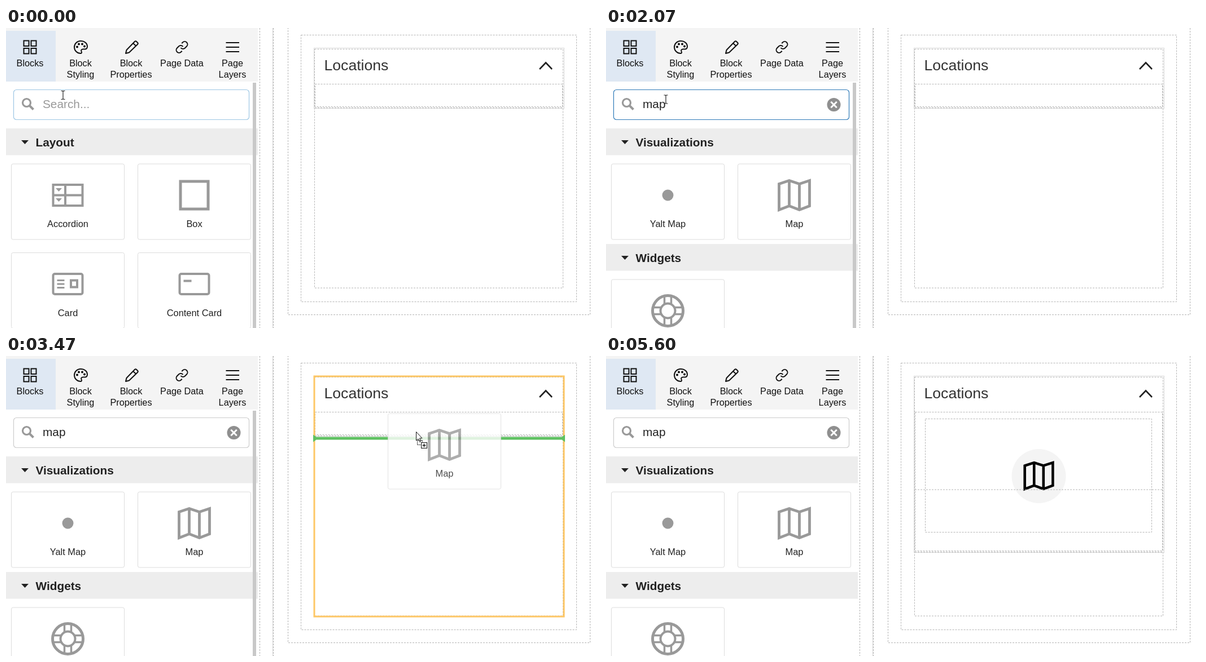
These frames come from a looping animation (1052x532 px, 6190 ms). An HTML page:

```html
<!DOCTYPE html>
<html lang="en">
<head>
<meta charset="utf-8">
<title>Page builder</title>
<style>
html, body { margin: 0; width: 100%; height: 100%; overflow: hidden; background: #fff; }
svg { display: block; width: 1052px; height: 532px; font-family: "Liberation Sans", Arial, sans-serif; }
.line { fill: none; stroke: #111; stroke-width: 2; stroke-linejoin: round; }
.dash { fill: none; stroke: #b4b4b4; stroke-dasharray: 3 2; }
.solid { fill: none; stroke: #dadada; }
.gray { fill: none; stroke: #999; stroke-width: 4; }
.drop { fill: none; stroke: #fec766; stroke-width: 3; }
.hover { fill: none; stroke: #3d9ae8; stroke-width: 1.4; }
.tab { font-size: 16.25px; text-anchor: middle; fill: #111; }
.name { font-size: 16.4px; text-anchor: middle; fill: #222; }
.head { font-size: 20.8px; font-weight: bold; fill: #222; }
.query { font-size: 20.8px; }
</style>
</head>
<body>
<svg id="stage" viewBox="0 0 1052 532"></svg>
<script>
const rect = (x, y, x2, y2, cls, extra = '') =>
  `<rect x="${x}" y="${y}" width="${x2 - x}" height="${y2 - y}" class="${cls}" ${extra}/>`;
const path = (d, cls, extra = '') => `<path d="${d}" class="${cls}" ${extra}/>`;
const text = (x, y, cls, s, extra = '') => `<text x="${x}" y="${y}" class="${cls}" ${extra}>${s}</text>`;
const group = (id, body, extra = '') => `<g id="${id}" ${extra}>${body}</g>`;
const at = (x, y, body) => `<g transform="translate(${x} ${y})">${body}</g>`;

const mapShape = 'M-27-20L-9-26 9-20 27-26V19L9 26-9 19-27 26ZM-9-26V19M9-20V26';

// Icons are drawn around their own centre.
const icons = {
  accordion: rect(-26, -18.5, 26, 18.5, 'gray') + path('M-26 0H26M-4.5-18V18', 'gray') +
    path('M-21.5-12.5h11l-5.5 6zM-21.5 5.5h11l-5.5 6z', '', 'fill="#999"'),
  box: rect(-24.5, -24.5, 24.5, 24.5, 'gray', 'style="stroke-width:5"'),
  card: rect(-26, -18, 26, 18, 'gray', 'rx="3"') +
    path('M-19-6.5H-6M-19 0H-6M-19 6.5H-6', 'gray', 'style="stroke-width:3"') +
    rect(5.5, -6.5, 16.5, 5.5, 'gray'),
  content: rect(-26, -18, 26, 18, 'gray', 'rx="3"') + path('M-19-5.5H-5', 'gray'),
  globe: '<circle r="10" fill="#999"/>',
  map: path(mapShape, 'gray', 'style="stroke-width:4.8"'),
  ring: '<circle r="27" class="gray" style="stroke-width:5"/><circle r="13" class="gray"/>' +
    [0, 90, 180, 270].map(a =>
      path('M-6-25V-12M6-25V-12', 'gray', `transform="rotate(${a})" style="stroke-width:3.5"`)).join('')
};

const card = (x, y, icon, label) => at(x, y,
  rect(0, 0, 200, 134, '', 'rx="3" fill="#fff" stroke="#dcdcdc"') +
  at(100, 55.5, icons[icon]) + text(100, 112, 'name', label));

const section = (y, title) =>
  rect(0, y, 446, y + 47.5, '', 'fill="#ededed"') +
  path(`M27 ${y + 21}h13l-6.5 7z`, '', 'fill="#222"') + text(52.5, y + 32, 'head', title);

const tabs =
  rect(0, 0, 446, 95, '', 'fill="#f4f4f4"') + rect(0, 5, 88, 95, '', 'fill="#dfe8f3"') +
  path('M31.5 22.5h9v9.5h-9zM44.5 22.5h9v9.5h-9zM31.5 36h9v9.5h-9zM44.5 36h9v9.5h-9z', 'line', 'style="stroke-linejoin:miter"') +
  path('M132 23a11 11 0 0 0 0 22c2 0 2.5-2 1.5-3.5c-1-2 0-4 3-4h3c3 0 4.5-2 4.5-5c0-5.5-5-9.5-12-9.5z', 'line') +
  [[126, 33.5], [129, 28.5], [135, 28.5], [139, 32.5]].map(([x, y]) => `<circle cx="${x}" cy="${y}" r="1.9"/>`).join('') +
  path('M212 45l1.5-6L228 24q1.5-1.5 3 0l2 2q1.5 1.5 0 3L218 43.5zM225 27l5.5 5', 'line') +
  at(299.5, 22, path('M10 13a5 5 0 0 0 7.54.54l3-3a5 5 0 0 0-7.07-7.07l-1.72 1.71M14 11a5 5 0 0 0-7.54-.54l-3 3a5 5 0 0 0 7.07 7.07l1.71-1.71', 'line')) +
  path('M389.5 26h23.5M389.5 34h23.5M389.5 42h23.5', 'line') +
  [[42.5, 'Blocks'], [132, 'Block', 'Styling'], [221.5, 'Block', 'Properties'], [311.5, 'Page Data'], [401, 'Page', 'Layers']]
    .map(([x, a, b = '']) => text(x, 67.5, 'tab', a) + text(x, 87.5, 'tab', b)).join('');

const search =
  rect(13.5, 109.5, 430.5, 162.5, '', 'id="field" rx="5" fill="#fff" stroke-width="1.2"') +
  '<circle cx="36.5" cy="132.5" r="7" class="gray" style="stroke-width:3.2"/>' +
  path('M41.5 137.5L48.5 144.5', 'gray') +
  text(65, 142, 'query', 'Search...', 'id="hint" fill="#999"') +
  text(65, 142, 'query', '', 'id="query" fill="#222"') +
  '<rect id="caret" y="124" width="1.6" height="23" fill="#111"/>' +
  group('clear', '<circle cx="403.5" cy="136" r="12" fill="#8f8f8f"/>' +
    path('M398.3 130.8l10.4 10.4m0-10.4l-10.4 10.4', '', 'stroke="#fff" stroke-width="3"'));

const blocks = section(178, 'Layout') +
  card(9.5, 241, 'accordion', 'Accordion') + card(233.5, 241, 'box', 'Box') +
  card(9.5, 398.5, 'card', 'Card') + card(233.5, 398.5, 'content', 'Content Card');

const results = section(178, 'Visualizations') +
  card(9.5, 241, 'globe', 'Yalt Map') + card(233.5, 241, 'map', 'Map') +
  section(383, 'Widgets') + card(9.5, 446, 'ring', '');

const accordion = bottom =>
  rect(545.5, 35.5, 988.5, bottom + 2.5, 'solid') + rect(547.5, 99.5, 985.5, bottom - 0.5, 'dash') +
  path(`M547 ${bottom + 1.5}H987`, 'dash');

const canvas =
  path('M449.5 0V532M473.5 0V532', 'dash') + path('M472.5 0V532', 'solid') +
  rect(499.5, -10, 1034.5, 508.5, 'dash') + rect(522.5, 12.5, 1010.5, 485.5, 'dash') +
  rect(546.5, 37.5, 986.5, 461, 'dash') +
  text(563.5, 75, '', 'Locations', 'font-size="26.6" fill="#333"') +
  path('M945 73L956 61.5 967 73', 'line', 'style="stroke-width:2.6;stroke:#222;stroke-linejoin:miter"') +
  group('empty', accordion(140)) +
  group('filled', accordion(346) + rect(565.5, 111.5, 966.5, 312.5, 'dash') +
    group('picture', '<circle cx="766.5" cy="213" r="48" fill="#f4f4f4"/>' +
      path(mapShape, '', 'transform="translate(766.5 212.5) scale(.92 .9)" fill="none" stroke="#000" stroke-width="5"')) +
    path('M547 237H987', 'dash'));

const marks =
  path('M473 0V532', 'drop', 'id="dropPage"') +
  rect(522, 12, 1011, 486, 'drop', 'id="dropColumn"') +
  rect(546, 36, 988, 462, 'drop', 'id="dropBox"') +
  group('slot', path('M6 0H440', '', 'stroke="#5fc162" stroke-width="5"') +
    path('M0-6.5L9 0 0 6.5zM446-6.5L437 0 446 6.5z', '', 'fill="#5fc162"')) +
  path('M473 0V532', 'hover', 'id="hoverPage"') +
  rect(522, 12, 1011, 486, 'hover', 'id="hoverColumn"') +
  group('hoverMap', rect(563.5, 110, 969, 314.5, 'hover') +
    rect(563, 85, 613, 110, '', 'fill="#3d9ae8"') +
    text(571, 103.3, '', 'Map', 'font-size="16.5" font-weight="bold" fill="#fff"'));

const pointers =
  group('ghost', card(0, 0, 'map', 'Map'), 'opacity=".8"') +
  group('beam', path('M-3.5-7.5H-1L0-6.5 1-7.5H3.5M0-6.5V6.5M-3.5 7.5H-1L0 6.5 1 7.5H3.5', '', 'fill="none" stroke="#222" stroke-width="1.2"')) +
  group('arrow', path('M.5.5V16L4 12.8 6.6 18.5 9 17.5 6.5 11.8H11z', '', 'fill="#fff" stroke="#111"') +
    group('copy', path('M2.5 15.5h9v8h-9z', '', 'fill="none" stroke="#111" stroke-dasharray="2 1"') +
      rect(9.5, 19.5, 19.5, 29.5, '', 'fill="#fff" stroke="#111"') +
      path('M11.5 24.5h6M14.5 21.5v6', '', 'stroke="#111" stroke-width="1.3"')));

const stage = document.getElementById('stage');
stage.innerHTML = tabs + search + group('blocks', blocks) + group('results', results) +
  rect(437, 97, 443, 532, '', 'id="scroll" fill="#c8c8c8"') + canvas + marks + pointers;

const el = {};
stage.querySelectorAll('[id]').forEach(e => el[e.id] = e);

const LOOP = 6190, FPS = 15;

// Tables of [tick, x, y]; ticks are fifteenths of a second.
const pointerPath = [
  [0, 101, 119], [1, 102, 124], [2, 102, 124], [3, 103.5, 126.5], [30, 103.5, 126.5],
  [31, 106, 126.5], [33, 132, 150], [36, 235, 238], [39, 308, 285], [40, 308, 285],
  [41, 330, 286], [42, 400, 287], [43, 485, 288], [44, 590, 288], [45, 678, 287],
  [47, 712, 215], [50, 723, 142], [52, 726, 134], [56, 726, 134], [70, 726, 134],
  [71, 718, 142], [73, 690, 175], [76, 603, 263], [77, 536, 320], [78, 468, 366],
  [79, 360, 425], [80, 230, 485], [81, 190, 500], [82, 147, 514], [83, 103, 526], [84, 60, 545]
];
const slotPath = [[44, 480, 70], [45, 501, 96], [46, 530, 130], [47, 544, 146]];

function along(table, n) {
  const i = table.findIndex(k => k[0] > n);
  if (i < 0) return table[table.length - 1].slice(1);
  if (i === 0) return table[0].slice(1);
  const [a, b] = [table[i - 1], table[i]], p = (n - a[0]) / (b[0] - a[0]);
  return [a[1] + (b[1] - a[1]) * p, a[2] + (b[2] - a[2]) * p];
}
const show = (id, on) => el[id].style.display = on ? '' : 'none';
const move = (id, x, y) => el[id].setAttribute('transform', `translate(${x} ${y})`);

function render(n) {
  const [x, y] = along(pointerPath, n);
  const within = (a, b) => n >= a && n < b;
  const typed = n < 18 ? '' : n < 20 ? 'm' : n < 22 ? 'ma' : 'map';
  const drag = within(41, 55), leave = n >= 71;

  el.query.textContent = typed;
  el.caret.setAttribute('x', 65.5 + (typed ? el.query.getComputedTextLength() : 0));
  el.field.setAttribute('stroke', n < 1 ? '#9cc6e4' : n < 41 ? '#2e7ab8' : '#ccc');
  show('caret', within(1, 10) || within(18, 31) || within(39, 41));
  show('hint', !typed);
  show('clear', typed);
  show('blocks', n < 24);
  show('results', n >= 24);
  show('scroll', n < 79);

  show('empty', n < 64);
  show('filled', n >= 64);
  show('picture', n >= 65);
  show('dropPage', drag && x > 449 && x < 523);
  show('dropColumn', n === 44);
  show('dropBox', drag && n >= 45);
  show('slot', drag && n >= 44);
  move('slot', ...along(slotPath, n));
  show('hoverPage', leave && x > 449 && x < 523);
  show('hoverColumn', leave && x >= 523 && x < 563);
  show('hoverMap', leave && x >= 563);

  const inField = n < 40 && y < 163;
  show('beam', inField);
  show('arrow', !inField);
  show('copy', drag);
  show('ghost', drag);
  move('beam', x, y);
  move('arrow', x, y);
  move('ghost', x - 49.5, y - 32);
}

const start = performance.now();
function frame() {
  const t = (performance.now() - start) % LOOP;
  render(Math.floor((t + 4) * FPS / 1000));
  requestAnimationFrame(frame);
}
frame();
</script>
</body>
</html>
```
